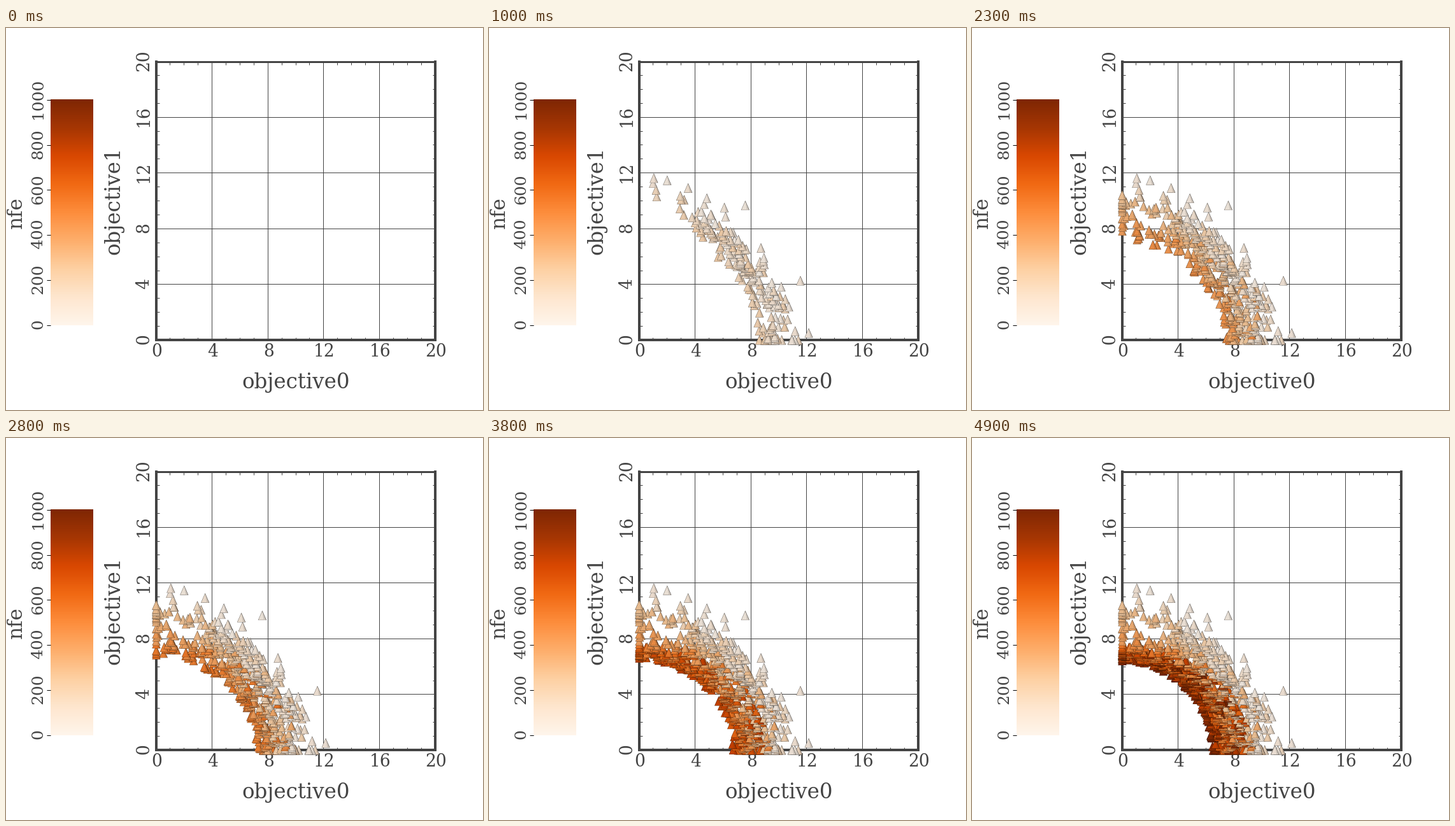
These frames come from a looping animation (749x600 px, 5.9 s). A matplotlib script:

```python
import numpy as np
import matplotlib.pyplot as plt
from matplotlib.animation import FuncAnimation
from matplotlib.collections import PolyCollection

W, H, DPI = 749, 600, 64
INK = "#444444"
LEFT, RIGHT, TOP, BOTTOM = 236, 674, 53, 490
UNIT = (RIGHT - LEFT) / 20
STEPS, FRAMES, STEP_MS = 49, 59, 100
EVALS = 1000
CMAP = plt.get_cmap("Oranges")


def front(t, a):
    """Radius of the front at progress t (0..1) and angle a: it shrinks to an arc."""
    arc = 6.2 + 3.2 * np.exp(-t / 0.35)
    foot = 0.6 * (1 - t) * np.cos(a) ** 6
    lip = 2.1 * np.sin(a) ** 8 / (1 + np.exp((t - 0.37) / 0.035))
    return arc + foot + lip


def solutions():
    """Rows of objective0, objective1, progress; the upper left is explored late."""
    rng = np.random.default_rng(12)
    t = np.arange(EVALS) / EVALS
    u, v, w = rng.random((3, EVALS))
    steep = rng.random(EVALS) < np.where(t < 0.22, 0.06, 0.26)
    top = np.where(t < 0.22, 86, 96)
    angle = np.where(steep, 66 + (top - 66) * u, 70 * v ** 1.1 - 4)
    a = np.radians(np.clip(angle, 0, 90))
    reach = 0.8 + 1.8 * np.cos(a) ** 2
    r = front(t, a) + reach * w ** 2
    pts = np.column_stack([r * np.cos(a), r * np.sin(a), t])
    # A few far outliers of the first generation
    pts[5:65:10, :2] = [(7.6, 9.65), (2, 11.45), (12.15, 0.5),
                        (6.1, 9.5), (11.55, 4.25), (3.5, 10.9)]
    return pts[np.argsort(pts[:, 1])]


def cones(pts):
    """Outline, lit face and shaded side of every cone, in pixels."""
    shapes = np.array([
        [(0, -7.6), (6.6, 7.4), (-6.6, 7.4)],
        [(-0.2, -6.4), (5.6, 7.1), (-6.1, 7.1)],
        [(-0.1, -6.4), (5.6, 7.1), (2.4, 7.1)],
    ])
    pos = np.column_stack([LEFT + UNIT * pts[:, 0], BOTTOM - UNIT * pts[:, 1]])
    verts = pos[:, None, None, :] + shapes
    light = np.array([0.3, 0.91, 0.8])
    rgb = CMAP(pts[:, 2])[:, None, :3] * light[:, None]
    return verts, rgb


fig = plt.figure(figsize=(W / DPI, H / DPI), dpi=DPI, facecolor="white")
ax = fig.add_axes([0, 0, 1, 1])


def line(xs, ys, width=1, color=INK):
    ax.plot(xs, ys, color=color, lw=width * 72 / DPI, zorder=1,
            solid_capstyle="projecting" if width > 1 else "butt")


def label(x, y, text, size, angle=0):
    ax.text(x, y, text, fontsize=size * 72 / DPI, family="DejaVu Serif", color=INK,
            rotation=angle, rotation_mode="anchor", ha="center", va="baseline")


def color_bar():
    ramp = np.linspace(1, 0, 355)[:, None]
    ax.imshow(ramp, cmap=CMAP, extent=(70, 137, 467, 112), aspect="auto",
              interpolation="nearest")
    for i in range(6):
        y = 466.5 - 70.7 * i
        line([64, 70], [y, y], color="black")
        label(57.5, y - 1.5, str(200 * i), 25, 90)
    label(24.5, 290, "nfe", 31, 90)


def plot_frame():
    for i in range(1, 20):
        x, y = LEFT + int(UNIT * i), BOTTOM - UNIT * i
        if i % 4 == 0:
            line([x, x], [TOP, BOTTOM])
            line([LEFT, RIGHT], [y, y])
        else:
            for end, inward in ((TOP, 4.5), (BOTTOM, -4.5)):
                line([x, x], [end, end + inward])
            for end, inward in ((LEFT, 4.5), (RIGHT, -4.5)):
                line([end, end + inward], [y, y])
    line([LEFT, LEFT], [TOP, BOTTOM], 4)
    line([RIGHT, RIGHT], [TOP, BOTTOM], 4)
    line([LEFT, RIGHT], [TOP, TOP], 3)
    line([LEFT, RIGHT], [BOTTOM, BOTTOM], 4)
    for v in range(0, 21, 4):
        label(LEFT + 1 + UNIT * v, 516.5, str(v), 26.5)
        label(224, BOTTOM - 1 - UNIT * v, str(v), 26.5, 90)
    label(455, 566, "objective0", 32.5)
    label(178.5, 271, "objective1", 32.5, 90)


color_bar()
plot_frame()
ax.set(xlim=(0, W), ylim=(H, 0))
ax.axis("off")

points = solutions()
verts, colors = cones(points)
swarm = PolyCollection([], linewidths=0, zorder=5)
ax.add_collection(swarm, autolim=False)


def update(frame):
    shown = points[:, 2] < min(frame, STEPS) / STEPS
    swarm.set_verts(verts[shown].reshape(-1, 3, 2))
    swarm.set_facecolor(colors[shown].reshape(-1, 3))
    return (swarm,)


anim = FuncAnimation(fig, update, frames=FRAMES, interval=STEP_MS,
                     repeat=True, repeat_delay=0, blit=False)
plt.show()
```
